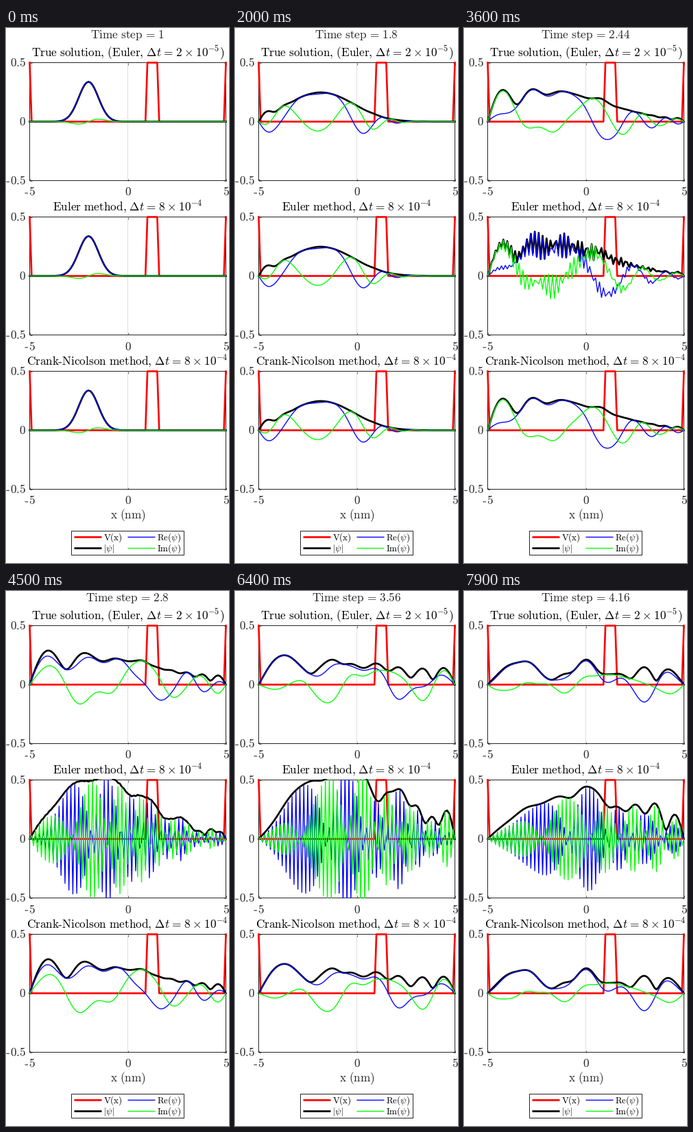
A matplotlib script that plays this animation: 325x780 px, repeating every 8000 ms.

```python
import numpy as np
import matplotlib.pyplot as plt
from matplotlib.animation import FuncAnimation
from matplotlib.patches import Rectangle

plt.rcParams["mathtext.fontset"] = "cm"
plt.rcParams["path.snap"] = False

W, H = 325, 780
PT = 0.72                 # points per pixel at 100 dpi
EM = 17.26
FRAMES, STEPS, DT = 80, 50, 8e-4
DARK = (0.15, 0.15, 0.15)
RED, BLACK, BLUE, GREEN = "#ff0000", "#000000", "#0000ff", "#00ff00"
THICK, THIN, HAIR = 2.67, 1.33, 1.0


# ---- Schroedinger equation on a grid, hbar = m = 1, psi = 0 at the walls ----
dx = 0.1
x = np.linspace(-5, 5, 101)
V = np.where((x > 0.95) & (x < 1.55), 1.0, 0.0)
n = len(x) - 2
ham = (np.diag(1 / dx**2 + V[1:-1])
       - np.diag(np.full(n - 1, 0.5 / dx**2), 1)
       - np.diag(np.full(n - 1, 0.5 / dx**2), -1))
V[[0, -1]] = 1.0


def euler(dt):
    return np.eye(n) - 1j * dt * ham


def crank_nicolson(dt):
    return np.linalg.solve(np.eye(n) + 0.5j * dt * ham, euler(dt / 2))


def normalize(psi):
    # plain square, not |psi|^2: the scale is complex
    return psi / np.sqrt((psi**2).sum(axis=1, keepdims=True))


def simulate():
    step = np.stack([np.linalg.matrix_power(euler(DT / 40), 40),
                     euler(DT), crank_nicolson(DT)])
    u = x[1:-1] + 2
    start = np.exp(-2 * u**2 + 0.2j * u)
    psi = normalize(np.stack([start] * 3)[:, :, None])
    out = np.zeros((FRAMES, 3, len(x)), complex)
    for k in range(FRAMES):
        out[k, :, 1:-1] = psi[:, :, 0]
        for _ in range(STEPS):
            psi = normalize(step @ psi)
    return out


waves = simulate()

# ---- Figure helpers, in pixels from the top left ----
fig = plt.figure(figsize=(W / 100, H / 100), dpi=100, facecolor="white")


def rm(s):
    s = s.replace(", ", r",\hspace{0.133} ").replace(" ", r"\ ")
    s = s.replace(r"\hspace{0.133}\ ", r"\hspace{0.133}")
    return r"\mathrm{" + s + "}"


def label(px, py, s, ha="center", size=EM, color=BLACK):
    return fig.text(px / W, 1 - py / H, f"${s}$", ha=ha, va="baseline",
                    fontsize=size * PT, color=color)


def box(px, py, w, h, **kw):
    fig.add_artist(Rectangle((px / W, 1 - (py + h) / H), w / W, h / H,
                             transform=fig.transFigure, **kw))


def hyphen(px, base, color):
    box(px, base - 0.245 * EM, 0.265 * EM, 0.06 * EM, fc=color, lw=0)


def number(px, base, s, ha):
    digits = s.lstrip("-")
    w = EM * sum(0.278 if c == "." else 0.5 for c in digits)
    left = px - (w if ha == "right" else w / 2)
    if s != digits:
        if ha == "center":
            left += 0.167 * EM
        hyphen(left - 0.322 * EM, base, DARK)
    label(left, base, rm(digits), "left", color=DARK)


def stroke(px0, px1, py, color, width):
    fig.add_artist(plt.Line2D([px0 / W, px1 / W], [1 - py / H] * 2,
                              transform=fig.transFigure, color=color,
                              lw=width * PT, solid_capstyle="butt"))


def delta_t(base, power):
    return (r"\Delta t\hspace{0.078}=\hspace{0.078}%d\hspace{0.04}\times"
            r"\hspace{0.04}10^{-%d}" % (base, power))


def panel(top):
    ax = fig.add_axes([34.5 / W, 1 - (top + 172) / H, 286 / W, 172 / H])
    ax.set(xlim=(-5, 5), ylim=(-0.5, 0.5),
           xticks=(-5, 0, 5), yticks=(-0.5, 0, 0.5))
    ax.set_axisbelow(True)
    ax.tick_params(direction="in", length=2.9 * PT, width=0.67 * PT,
                   color=DARK, top=True, right=True,
                   labelbottom=False, labelleft=False)
    for spine in ax.spines.values():
        spine.set(color=DARK, linewidth=HAIR * PT)
    ax.axvline(0, color="0.87", lw=HAIR * PT, zorder=0.4)
    for i, s in enumerate(("-5", "0", "5")):
        number(34.5 + 143 * i, top + 194, s, "center")
    for i, s in enumerate(("0.5", "0", "-0.5")):
        number(28, top + 5.5 + 86 * i, s, "right")

    def curve(color, width, z):
        # strokes may overhang the box by half their width
        line, = ax.plot(x, V / 2, color=color, lw=width * PT, zorder=z,
                        solid_joinstyle="round")
        line.set_clip_box(ax.bbox.padded(width / 2))
        return line

    curve(RED, THICK, 3)
    return [curve(BLACK, THICK, 4), curve(BLUE, THIN, 5),
            curve(GREEN, THIN, 6)]


# ---- Static layout ----
panels = [panel(top) for top in (50.5, 275.5, 500.5)]
clock = label(177, 15.5, "", color=DARK)
label(177.5, 41.5, rm("True solution, (Euler, ") + delta_t(2, 5) + ")")
label(177.5, 266.5, rm("Euler method, ") + delta_t(8, 4))
label(29.5, 491.5, rm("Crank") + r"\hspace{0.333}" + rm("Nicolson method, ")
      + delta_t(8, 4), "left")
hyphen(76.3, 491.5, BLACK)
label(178, 715.5, rm("x (nm)"), color=DARK)

box(95.5, 733.5, 164, 35, fc="white", ec=DARK, lw=HAIR * PT)
legend = [(99.5, 742.3, RED, THICK, rm("V(x)")),
          (99.5, 758.5, BLACK, THICK, r"|\psi|"),
          (177.5, 742.3, BLUE, THIN, rm("Re(") + r"\psi" + rm(")")),
          (177.5, 758.5, GREEN, THIN, rm("Im(") + r"\psi" + rm(")"))]
for px, py, color, width, s in legend:
    stroke(px, px + 40, py, color, width)
    label(px + 42.5, py + 4, s, "left", size=13.1)


def draw(k):
    now = f"{1 + 0.04 * k:.4g}"
    clock.set_text("$" + rm("Time step") + r"\hspace{0.133}=\hspace{0.133}"
                   + rm(now) + "$")
    for lines, psi in zip(panels, waves[k]):
        for line, y in zip(lines, (np.abs(psi), psi.real, psi.imag)):
            line.set_ydata(y)
    return [clock] + sum(panels, [])


anim = FuncAnimation(fig, draw, frames=FRAMES, interval=100,
                     repeat=True, repeat_delay=0, blit=False)
plt.show()
```
